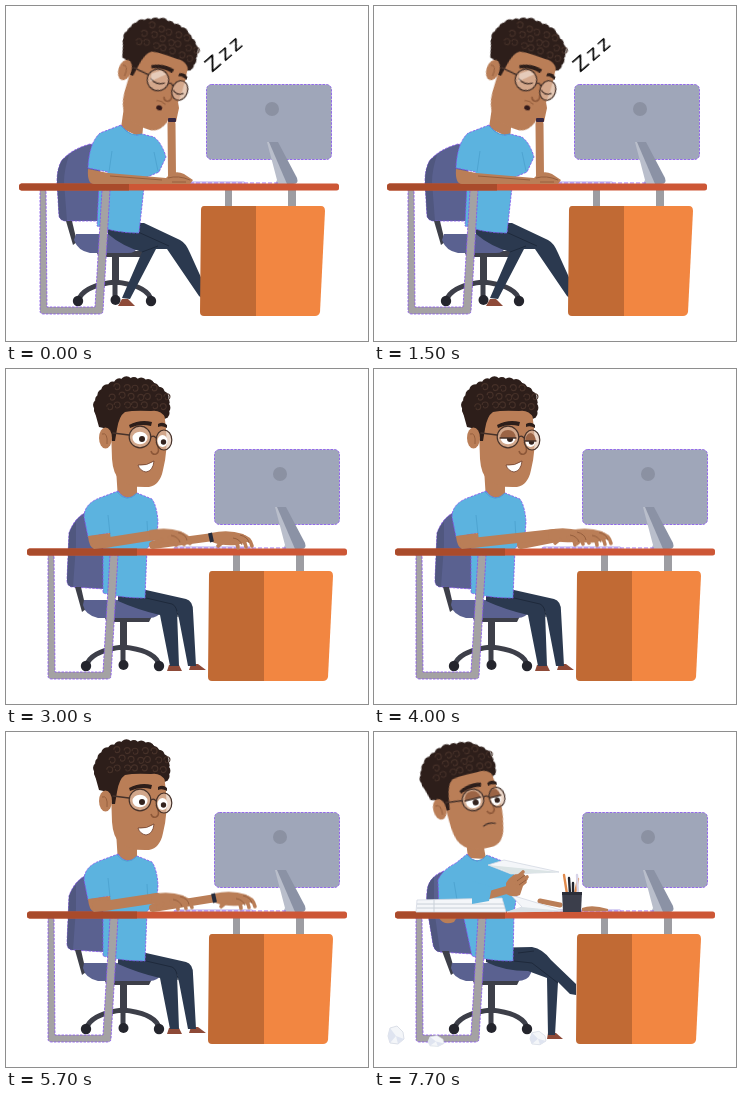
Animation, 362 px wide and 335 px high, one loop 8 s. Source, as an HTML page:

```html
<!DOCTYPE html>
<html lang="en">
<head>
<meta charset="utf-8">
<title>Office day</title>
<style>
html, body { margin: 0; width: 100%; height: 100%; overflow: hidden; background: #fff; }
svg { display: block; width: 100vw; height: 100vh; }
.skin { fill: #ba7e57; }
.shade { fill: #9b6445; }
.hair { fill: #2d1e1a; }
.curl { fill: none; stroke: #463129; stroke-width: 1.1; }
.shirt { fill: #5cb3df; }
.fold { fill: none; stroke: #4ea4d1; stroke-width: 1; }
.pants { fill: #2b394f; }
.crease { fill: none; stroke: #1e293b; stroke-width: 1; }
.shoe { fill: #8e4a38; }
.chair { fill: #5a6190; }
.dark { fill: #50577f; }
.metal { fill: #3d3f49; }
.steel { fill: #a4a2a3; }
.paper { fill: #f4f6f9; stroke: #d3d9e2; stroke-width: .8; }
.rim { stroke: #8550ee; stroke-width: .8; stroke-dasharray: 2.5 1.2; }
.arm { fill: none; stroke: #ba7e57; stroke-width: 10; stroke-linecap: round; stroke-linejoin: round; }
.arm.mid { stroke-width: 8; }
.arm.thin { stroke-width: 5; }
.finger { fill: none; stroke: #ba7e57; stroke-width: 3.6; stroke-linecap: round; }
.knuckle { fill: none; stroke: #8c5738; stroke-width: .8; }
.line { fill: none; stroke: #46322a; stroke-width: 1.3; stroke-linecap: round; }
.frame { fill: none; stroke: #46322a; stroke-width: 1.2; }
.zzz { font: 20px "DejaVu Sans", sans-serif; letter-spacing: 3.5px; }

.scene, .move { animation: 8s infinite; }
.scene { animation-timing-function: step-end; }
.move { animation-timing-function: ease-in-out; }
.nap { animation-name: nap; }
.type { animation-name: type; }
.plan { animation-name: plan; }
.nod { animation-name: nod; transform-origin: 118px 118px; }
.drift { animation-name: drift; }
.lids { animation: blink 8s step-end infinite; }
.near { animation-name: near; }
.far { animation-name: far; }
.nearArm { animation-name: nearArm; }
.farArm { animation-name: farArm; }
.tap { animation: tap .4s ease-in-out infinite alternate; }
.tap.late { animation-delay: -.2s; }
.lean { animation-name: lean; }
.rock { animation-name: rock; transform-origin: 112px 164px; }

@keyframes nap { 0% { visibility: visible } 36.25%, 100% { visibility: hidden } }
@keyframes type { 0% { visibility: hidden } 36.25% { visibility: visible } 73.75%, 100% { visibility: hidden } }
@keyframes plan { 0% { visibility: hidden } 73.75%, 100% { visibility: visible } }
@keyframes nod {
  0%, 18.75%, 37.5%, 100% { transform: none }
  9.375%, 28.125% { transform: rotate(-1.5deg) }
}
@keyframes drift {
  0%, 18.75%, 37.5%, 100% { transform: none }
  9.375%, 28.125% { transform: translate(1px, -1px) }
}
@keyframes blink { 0% { opacity: 0 } 48.75% { opacity: 1 } 51.25%, 100% { opacity: 0 } }
@keyframes near {
  0%, 37.5% { transform: none }
  46%, 53% { transform: translate(31px, -1px) }
  62%, 71.25%, 100% { transform: translate(2px, 0) }
}
@keyframes nearArm {
  0%, 37.5% { d: path("M91 173L98 174L149 166") }
  46%, 53% { d: path("M91 173L98 174L180 165") }
  62%, 71.25%, 100% { d: path("M91 173L98 174L151 166") }
}
@keyframes far {
  0%, 37.5% { transform: none }
  46%, 53% { transform: translate(-9px, -2px) }
  62%, 71.25%, 100% { transform: translate(3px, -2px) }
}
@keyframes farArm {
  0%, 37.5% { d: path("M147 176L207 168") }
  46%, 53% { d: path("M147 176L198 166") }
  62%, 71.25%, 100% { d: path("M147 176L210 166") }
}
@keyframes tap { from { transform: translateY(-.6px) } to { transform: translateY(.6px) } }
@keyframes lean {
  0%, 73.75% { transform: translate(103px, 67px) rotate(-9deg) }
  83.75% { transform: translate(102px, 67px) rotate(-11deg) }
  93.75%, 100% { transform: translate(99px, 68px) rotate(-14deg) }
}
@keyframes rock {
  0%, 73.75%, 83.75%, 93.75%, 100% { transform: none }
  78.75% { transform: rotate(-2.5deg) }
  88.75% { transform: rotate(2.5deg) }
}
</style>
</head>
<body>
<svg viewBox="0 0 362 335" preserveAspectRatio="none">
<defs>
  <g id="desk">
    <path fill="#9d9da2" d="M227 186h7v18h-7zM290 186h8v18h-8z"/>
    <path fill="#c16a34" d="M206 202H258V312H206Q202 312 202 308L203 206Q203 202 206 202Z"/>
    <path fill="#f28641" d="M258 202H323Q327 202 327 207L322 308Q321 312 317 312H258Z"/>
    <path class="steel rim" fill-rule="evenodd" d="M42 186H48L49 303H97L104 186H112L105 307Q105 310 101 310H46Q42 310 42 307Z"/>
    <rect x="208.500" y="80.500" width="125" height="75" rx="5" fill="#9fa6b9" class="rim"/>
    <circle cx="274" cy="105" r="7" fill="#8b91a2"/>
    <path fill="#b9becb" d="M269 138H274L291 174V180H277L279 176Z"/>
    <path fill="#8b92a5" d="M271 138H280L299 174Q301 180 295 180H289Z"/>
    <path fill="#d9d2f3" d="M170 177H246L248 180H166Z"/>
    <path d="M168 179H282" stroke="#8550ee" stroke-width=".8" stroke-dasharray="4 2"/>
    <rect x="21" y="179.500" width="320" height="7" rx="2.500" fill="#cd5736"/>
    <path fill="#a94b2b" d="M131 179.500H23.500Q21 180 21 183Q21 186 23.500 186.500H131Z"/>
  </g>

  <g id="base">
    <path class="metal" d="M114 248H121V280H114zM98 247H146L143 253H101Z"/>
    <path fill="none" stroke="#3d3f49" stroke-width="5" stroke-linecap="round" d="M82 293Q89 281 117 278Q146 281 152 293M117 278V292"/>
    <g fill="#24252d"><circle cx="80" cy="297" r="5.200"/><circle cx="117.500" cy="296" r="5"/><circle cx="153" cy="297" r="5.200"/></g>
  </g>

  <g id="head">
    <g id="curls"></g>
    <path class="skin" d="M105 60L110 46Q130 34 158 42L160 60Q162 82 157 101Q154 116 143 118Q123 119 114 111Q107 105 106 90Z"/>
    <path class="hair" d="M106 72L102 60L93 58L88 40L97 18L120 10L146 12L160 24L163 40L160 49Q154 40 145 42Q128 41 119 43Q113 47 111 60L109 72Z"/>
    <ellipse class="skin" cx="99.500" cy="69" rx="6.500" ry="10.500"/>
    <path class="knuckle" d="M96 65Q102 63 101 75"/>
    <path class="line" d="M107 64L123 66M145 68Q148 66 150 69"/>
    <path fill="none" stroke="#8c5738" stroke-width="1.500" d="M150 73Q155 83 150 85Q146 86 145 82"/>
    <path class="hair" d="M123 56Q134 50 146 53L145 57Q134 54 124 59ZM152 55Q157 52 161 56L161 59Q156 56 152 58Z"/>
  </g>
  <g id="glasses">
    <circle cx="134" cy="68" r="10.800"/><ellipse cx="158" cy="71" rx="7.800" ry="10"/>
  </g>
  <g id="eyes">
    <ellipse cx="134" cy="69" rx="7.500" ry="6.200" fill="#fff"/><ellipse cx="156.500" cy="72" rx="5" ry="6" fill="#fff"/>
    <g fill="#33231e"><circle cx="136" cy="70" r="3"/><circle cx="157.500" cy="73" r="2.700"/></g>
  </g>
  <g id="halfLids">
    <path class="shade" d="M126 69Q127 61 134 61Q141 61 142 69ZM151 72Q152 64 157 64Q161 65 162 72Z"/>
    <path class="line" d="M126 69H142M151 72H162"/>
  </g>

  <g id="hand">
    <path class="skin" d="M143 162Q160 158 175 163Q184 168 180 171L168 174Q154 175 144 171Z"/>
    <path class="finger" d="M173 165Q182 166 184 175M169 167Q177 169 178 176M163 169Q170 171 170 177M155 171L150 175"/>
    <path class="knuckle" d="M165 167Q172 168 174 174M172 164Q180 166 181 172"/>
  </g>
  <g id="ball">
    <path class="paper" d="M-8 1L-6 -7L1 -9L7 -3L8 4L2 9L-6 8Z"/>
    <path fill="#dfe4f0" d="M-6 -7L0 1L-6 8L-8 1ZM0 1L8 4L2 9Z"/>
  </g>
</defs>

<g class="scene nap">
  <use href="#base" x="-8" y="-2"/>
  <path class="chair rim" d="M84 138Q66 143 56 154Q51 162 51 176L53 210Q54 215 61 215H94V140Z"/>
  <path class="dark" d="M56 154Q51 162 51 176L53 210Q54 215 61 215L58 176Q58 164 63 149Z"/>
  <path class="metal" d="M60 215H66L71 236L67 239Z"/>
  <path class="chair" d="M70 228H126Q132 230 131 241Q130 247 122 247H84Q72 245 68 234Z"/>
  <path class="shoe" d="M116 293L122 293L129 300H112Z"/>
  <path class="pants" d="M100 217H138L174 234Q180 237 184 247L198 278V294L193 290L161 243L150 243L124 293L116 292L136 246Q116 240 102 228Z"/>
  <path class="crease" d="M132 226L163 240M136 246L152 240"/>
  <path class="skin" d="M119 94L138 112L136 132L115 122Z"/>
  <path class="shirt rim" d="M115 119Q125 132 136 128L148 131Q156 137 160 151L153 166L139 172L133 227Q110 227 91 220L93 178L102 166L82 162Q83 137 94 127Z"/>
  <path class="fold" d="M115 120Q125 132 136 128M106 145L103 166M148 146L152 165"/>
  <use href="#desk" x="-8" y="-2"/>
  <path class="arm mid" d="M166 170L165.500 118"/>
  <g transform="translate(152 74) rotate(18.500) translate(-134 -68)">
    <g class="move nod">
      <use href="#head"/>
      <use href="#glasses" fill="#dcb79d" fill-opacity=".75" stroke="#46322a" stroke-width="1.200"/>
      <path class="line" d="M127 69Q134 74 141 69M152 73Q157 77 162 73"/>
      <path fill="#fff" opacity=".4" d="M126 64L134 58L140 60L127 72Z"/>
      <ellipse cx="144" cy="94" rx="3" ry="2.500" fill="#32191a"/>
      <path class="knuckle" d="M139 88Q144 86 149 89"/>
    </g>
  </g>
  <path class="skin" d="M162 116L162 106Q166 100 172 96L173 102L170 116Z"/>
  <rect x="162" y="112" width="8" height="4" rx="1" fill="#35263f"/>
  <path class="skin" d="M82 163L102 167L160 172Q168 163 178 168L187 174L184 178H88Q81 178 82 163Z"/>
  <path class="knuckle" d="M162 172Q172 169 184 174M166 176L180 176M104 170L156 174"/>
  <g class="move drift"><text class="zzz" transform="translate(206 67) rotate(-41)">Zzz</text></g>
</g>

<g class="scene type">
  <use href="#base"/>
  <path class="chair rim" d="M83 142Q69 147 63 164L61 211Q61 218 67 218L98 220V144Z"/>
  <path class="dark" d="M70 153Q65 158 63 164L61 211Q61 218 67 218L70 176Z"/>
  <path class="metal" d="M69 218H75L80 240L76 243Z"/>
  <path class="chair" d="M78 231H150Q156 233 155 241Q153 249 143 249H92Q79 246 77 236Z"/>
  <path class="shoe" d="M163 296H173L176 302H161ZM185 295H192L200 301H183Z"/>
  <path class="pants" d="M112 221H140L180 230Q187 232 187 242L190 297H182L173 250L171 242L173 297H164L154 246Q132 241 112 232Z"/>
  <path class="crease" d="M140 229L166 235Q171 237 172 248"/>
  <path class="skin" d="M110 98L131 112V132H112Z"/>
  <path class="shirt rim" d="M112 122Q121 134 131 124L146 130Q151 137 152 153L151 166L141 180L139 229Q115 229 97 224V180L104 164L82 168L78 148Q78 134 96 128Z"/>
  <path class="fold" d="M111 123Q121 135 131 124M102 146L104 165M141 152L142 170"/>
  <use href="#desk"/>
  <use href="#head"/>
  <use href="#glasses" fill="#e2c3ae" fill-opacity=".6"/>
  <use href="#eyes"/>
  <use class="lids" href="#halfLids"/>
  <use class="frame" href="#glasses"/>
  <path fill="#fff" stroke="#70402e" stroke-width=".8" d="M132 96Q141 97 148 92Q147 102 140 103Q134 102 132 96Z"/>
  <path class="move arm mid farArm" d="M147 176L207 168"/>
  <g class="move far"><g class="tap">
    <use href="#hand" x="62" y="2"/>
    <path d="M204 164L206 173" stroke="#252b3b" stroke-width="4"/>
  </g></g>
  <path class="skin" d="M82 167L104 164L106 178L88 180Q83 178 82 167Z"/>
  <path class="move arm nearArm" d="M91 173L98 174L149 166"/>
  <g class="move near"><g class="tap late"><use href="#hand"/></g></g>
</g>

<g class="scene plan">
  <use href="#base"/>
  <path class="chair rim" d="M70 139Q58 143 54 154Q52 162 53 176L59 212Q60 219 66 220L98 222V146Z"/>
  <path class="dark" d="M60 145Q56 148 54 154Q52 162 53 176L59 212Q60 219 66 220L60 176Z"/>
  <path class="metal" d="M68 219H75L81 240L77 243Z"/>
  <path class="chair" d="M78 231H150Q158 233 157 241Q154 249 143 249H92Q79 246 77 236Z"/>
  <path class="shoe" d="M174 301H182L189 307H173Z"/>
  <path class="pants" d="M112 216L158 215Q169 217 177 228L202 252V263L196 262L184 250L181 303H174L173 246L154 239Q130 239 112 230Z"/>
  <path class="crease" d="M140 229L158 231L184 251M144 221L160 219"/>
  <path class="skin" d="M91 100L109 110L112 127L94 126Z"/>
  <path class="shirt rim" d="M93 122Q103 135 113 123L128 129Q140 138 145 152L140 180L139 229Q115 229 98 224L89 182L65 180L64 148Q68 138 82 131Z"/>
  <path class="fold" d="M93 123Q103 135 113 123M80 150L83 168"/>
  <path class="skin" d="M64 177H88L80 190Q70 194 65 186Z"/>
  <use href="#desk"/>
  <g class="move lean"><g transform="translate(-134 -68)">
    <use href="#head"/>
    <use href="#glasses" fill="#e2c3ae" fill-opacity=".65"/>
    <use href="#eyes" y="1"/>
    <use href="#halfLids" y="-2"/>
    <use class="frame" href="#glasses"/>
    <path class="line" d="M138 96Q143 93 150 96"/>
  </g></g>
  <path class="paper" d="M43 168L128 166L132 180H42Z"/>
  <path fill="none" stroke="#c9d0d8" d="M43 172H130M43 176H131M60 168V180"/>
  <path class="arm thin" d="M166 169L186 173"/>
  <path class="paper" d="M137 163L190 179L133 180L148 175Z"/>
  <path fill="#dbe2e7" d="M148 175L190 179L133 180Z"/>
  <g class="move rock">
    <path class="arm mid" d="M112 164L136 157"/>
    <path class="shirt" d="M98 149L118 155L115 169L98 172Z"/>
    <path class="skin" d="M132 151Q138 141 148 140L154 147L149 154L146 163Q139 166 132 162Z"/>
    <path class="paper" d="M114 133L130 128L185 140L137 142Z"/>
    <path fill="#dbe4e5" d="M114 133L185 140L137 142L129 138Z"/>
    <path class="finger" d="M140 148L149 140M143 151L153 145M144 155L151 150"/>
    <path class="knuckle" d="M143 149L151 143M145 153L152 148"/>
  </g>
  <g stroke-width="2.400" stroke-linecap="round">
    <path stroke="#e08a4d" d="M193 162L190 143M201 162L204 147"/>
    <path stroke="#23252e" d="M196 162L195 146M199 162L199 151"/>
    <path stroke="#d8d4e8" d="M204 162L203 143"/>
  </g>
  <path fill="#3b3e4b" d="M188 160H208L207 180H189Z"/>
  <path fill="#2b2e39" d="M188 160H208V163H188z"/>
  <path class="skin" d="M208 176Q218 172 234 177V179H208Z"/>
  <use href="#ball" x="22" y="303"/>
  <use href="#ball" transform="translate(62 309) scale(1 .6)"/>
  <use href="#ball" transform="translate(164 306) scale(1 .75)"/>
</g>
</svg>
<script>
// Curly hair: bumps around the crown, then small loops over it
const curls = document.getElementById("curls");
const crown = document.querySelector("#head .hair");
const add = (tag, attrs, before) => {
  const el = document.createElementNS("http://www.w3.org/2000/svg", tag);
  for (const k in attrs) el.setAttribute(k, attrs[k]);
  before ? before.before(el) : curls.append(el);
};
for (let i = 0; i < 18; i++) {
  const a = Math.PI * (0.87 + i * 0.072);
  add("circle", { class: "hair", cx: 126 + 33 * Math.cos(a), cy: 37 + 24 * Math.sin(a), r: 5 + i % 3 * .5 });
}
let seed = 7;
const rnd = () => (seed = seed * 16807 % 2147483647) / 2147483647;
const next = crown.nextElementSibling;
for (let row = 0; row < 3; row++) {
  for (let col = 0; col < 7; col++) {
    const x = 98 + col * 9 + row % 2 * 4 + rnd() * 3, y = 17 + row * 9 + rnd() * 3;
    if (Math.hypot((x - 126) / 35, (y - 38) / 27) > 1) continue;
    add("path", { class: "curl", d: `M${x} ${y}a3 3 0 1 1 3 3q-2 0 -1.500 -2` }, next);
  }
}
</script>
</body>
</html>
```
